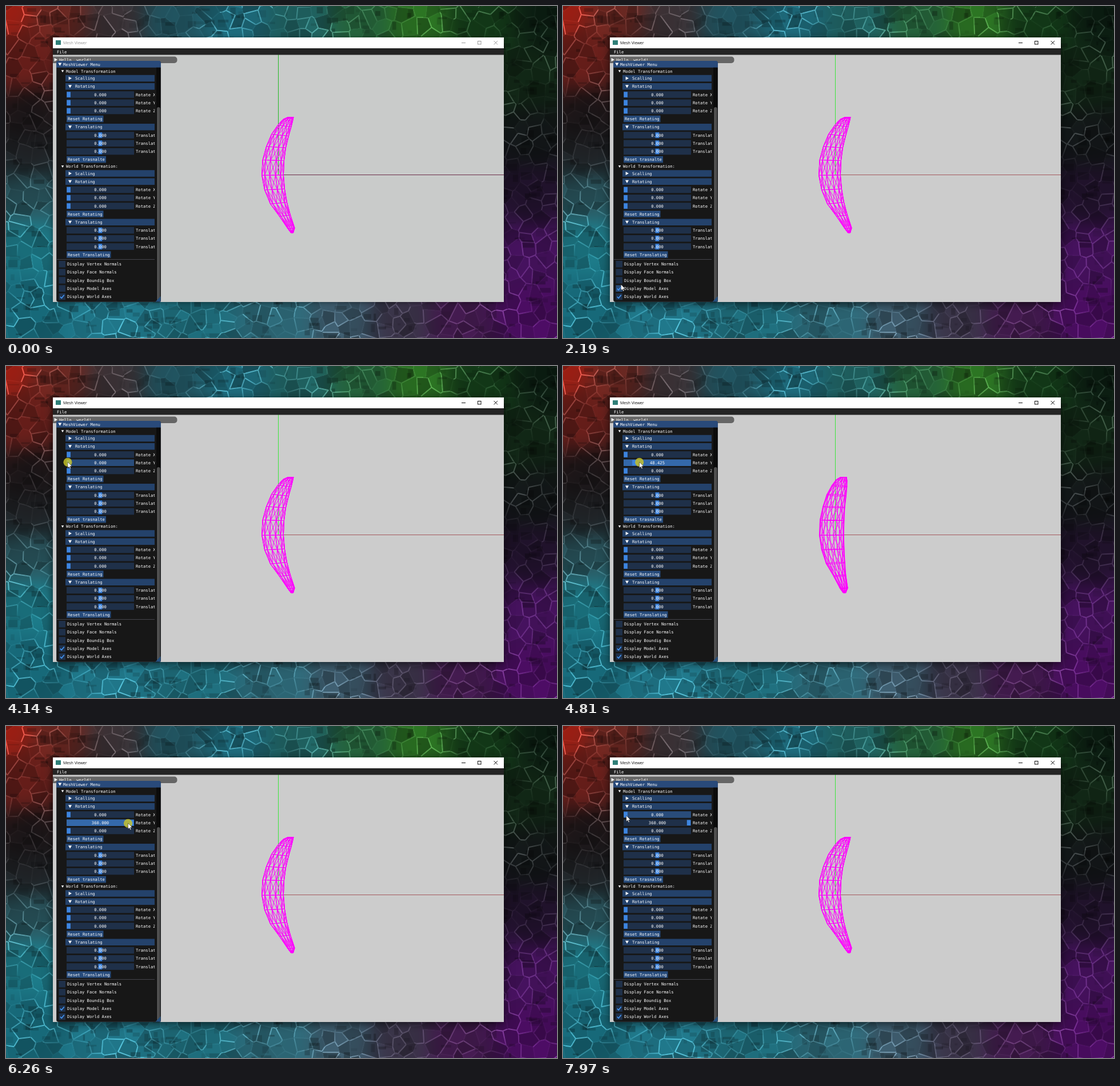
An HTML page with a canvas for the animation above (8 s loop, 964 by 581 pixels).

```html
<!DOCTYPE html>
<html lang="en">
<head>
<meta charset="utf-8">
<title>Mesh Viewer</title>
<style>
html, body { margin: 0; width: 100%; height: 100%; overflow: hidden; background: #123; }
canvas { display: block; }
</style>
</head>
<body>
<canvas id="stage" width="964" height="581"></canvas>
<script>
const W = 964, H = 581, LOOP = 8000, STEP = 57.5, LAG = 110;
const ctx = document.getElementById('stage').getContext('2d');
const MONO = '7.2px "DejaVu Sans Mono", monospace';
const clamp = (v, a, b) => Math.max(a, Math.min(b, v));
const hash = n => { const s = Math.sin(n * 127.1 + 11.7) * 43758.5453; return s - Math.floor(s); };

// ---------- wallpaper: cracked cells over a blend of colour spots ----------
const SPOTS = [
  [0, 0, 0x8c1a10], [90, 10, 0x64251f], [190, 25, 0x372f33], [290, 25, 0x1d4b56],
  [400, 25, 0x1b6373], [520, 25, 0x1d5a5a], [620, 25, 0x205633], [720, 20, 0x296c20],
  [830, 20, 0x123817], [950, 20, 0x0a1a10], [30, 100, 0x621c18], [40, 190, 0x181416],
  [40, 260, 0x1c1d20], [40, 330, 0x275058], [40, 420, 0x1a727f], [40, 520, 0x15606f],
  [910, 130, 0x102414], [920, 230, 0x111516], [920, 330, 0x1d1027], [920, 430, 0x3f1055],
  [920, 540, 0x440b59], [180, 550, 0x1d6c7d], [330, 550, 0x1b626f], [480, 550, 0x2a6270],
  [590, 550, 0x385363], [690, 550, 0x342e40], [790, 550, 0x3d1847]
];

function blend(x, y) {
  let r = 0, g = 0, b = 0, sum = 0;
  for (const [sx, sy, c] of SPOTS) {
    const w = 1 / ((x - sx) ** 2 + (y - sy) ** 2 + 1500) ** 2;
    r += w * (c >> 16); g += w * (c >> 8 & 255); b += w * (c & 255); sum += w;
  }
  return [r / sum, g / sum, b / sum];
}

// slow waves from 0 to 1 that make the cracks glow in patches
const patch = (x, y) => .5 + .25 * Math.sin(x / 31 + 2 * Math.sin(y / 43)) + .25 * Math.sin(y / 27 + 2 * Math.sin(x / 57));

function makeWallpaper() {
  const cv = document.createElement('canvas');
  cv.width = W; cv.height = H;
  const g = cv.getContext('2d'), img = g.createImageData(W, H), G = 23;
  const site = (i, j) => {
    const id = i * 57 + j * 131;
    return { id, x: (i + .5 + (hash(id) - .5) * .95) * G, y: (j + .5 + (hash(id + .5) - .5) * .95) * G };
  };
  const sites = [];
  const cols = Math.ceil(W / G) + 4, rows = Math.ceil(H / G) + 4;
  for (let j = 0; j < rows; j++) for (let i = 0; i < cols; i++) sites.push(site(i - 2, j - 2));
  for (let y = 0; y < H; y++) for (let x = 0; x < W; x++) {
    if (x > 82 && x < 870 && y > 55 && y < 517) continue;
    const ci = Math.floor(x / G) + 2, cj = Math.floor(y / G) + 2;
    let a, b, da = 1e9, db = 1e9;
    for (let j = cj - 1; j <= cj + 1; j++) for (let i = ci - 1; i <= ci + 1; i++) {
      const s = sites[j * cols + i], d = (s.x - x) ** 2 + (s.y - y) ** 2;
      if (d < da) { b = a; db = da; a = s; da = d; } else if (d < db) { b = s; db = d; }
    }
    const edge = (db - da) / (2 * Math.hypot(a.x - b.x, a.y - b.y));
    const k = clamp(1.5 - edge, 0, 1) * (hash(a.id + b.id + .3) > .3 ? patch(x, y) : .1);
    const shade = .8 + .35 * hash(a.id + .8), p = (y * W + x) * 4;
    blend(x, y).forEach((c, n) => {
      img.data[p + n] = c * shade + (c * .4 + 48) * k;
    });
    img.data[p + 3] = 255;
  }
  g.putImageData(img, 0, 0);
  for (let n = 0; n < 900; n++) {
    g.fillStyle = `rgba(0,0,0,${.06 + .2 * hash(n + .1)})`;
    g.fillRect(hash(n + .2) * W, hash(n + .4) * H, 3 + hash(n + .6) * 18, 2 + hash(n + .7) * 12);
  }
  return cv;
}
const wallpaper = makeWallpaper();

// ---------- pointer ----------
const PATH = [
  [210, 893, 572], [450, 560, 430], [700, 260, 330], [960, 142, 301], [1770, 97, 490],
  [2080, 101, 488], [2330, 102, 486], [2610, 120, 383], [2917, 131, 254], [3027, 133, 236],
  [3420, 118, 208], [3790, 108, 168], [4200, 108, 168], [4750, 126, 168], [5000, 158, 168],
  [5217.5, 185.43, 168], [5327.5, 201, 168.5], [5450, 207, 169], [5780, 224, 169],
  [5980, 224, 170], [6137.5, 221, 170], [6247.5, 213.5, 170], [6450, 210, 170],
  [6600, 212, 170], [6900, 240, 170], [7080, 240, 170], [7400, 190, 160], [7860, 111, 157],
  [7972, 110.5, 156.5]
];
function pointer(t) {
  if (t < PATH[0][0]) return null;
  const n = PATH.findIndex(k => k[0] > t);
  if (n < 0) return PATH[PATH.length - 1].slice(1);
  const [ta, xa, ya] = PATH[n - 1], [tb, xb, yb] = PATH[n], u = (t - ta) / (tb - ta);
  return [xa + (xb - xa) * u, ya + (yb - ya) * u];
}

// ---------- drawing helpers ----------
function box(x, y, w, h, fill, r = 0) {
  ctx.fillStyle = fill;
  ctx.beginPath();
  ctx.roundRect(x, y, w, h, r);
  ctx.fill();
}
function poly(points, fill) {
  ctx.fillStyle = fill;
  ctx.beginPath();
  points.forEach(([x, y]) => ctx.lineTo(x, y));
  ctx.closePath();
  ctx.fill();
}
function line(x1, y1, x2, y2, color, width = 1) {
  ctx.strokeStyle = color;
  ctx.lineWidth = width;
  ctx.beginPath();
  ctx.moveTo(x1, y1);
  ctx.lineTo(x2, y2);
  ctx.stroke();
}
function text(s, x, y, align = 'left', color = '#fff', font = MONO) {
  ctx.font = font;
  ctx.fillStyle = color;
  ctx.textAlign = align;
  ctx.textBaseline = 'alphabetic';
  ctx.fillText(s, x, y + 2.6);
}
function arrow(x, y, open, s = 3) {
  poly(open ? [[x - s, y - s * .8], [x + s, y - s * .8], [x, y + s]]
            : [[x - s * .8, y - s], [x + s, y], [x - s * .8, y + s]], '#fff');
}

// ---------- mesh ----------
// rings: height, left and right edge around the vertical axis
const RINGS = [
  [194.5, 17, 26.5], [200, 8, 25], [210, -1, 22.5], [226, -12, 18], [247, -21, 13], [270, -27.5, 10],
  [296, -29, 9], [321, -24, 11], [345, -14, 15], [367, 2, 21], [389, 16.5, 28.5], [397, 22, 26]
];
const SIDES = 12, OX = 476.5, OY = 295.5;
const mid = ([, l, r]) => (l + r) / 2;
const verts = RINGS.map((ring, i) => {
  const [y, l, r] = ring, up = RINGS[i - 1], down = RINGS[i + 1];
  const tilt = up && down ? -.25 * (mid(down) - mid(up)) / (down[0] - up[0]) : 0;
  return Array.from({ length: SIDES }, (_, k) => {
    const a = (k + .5) / SIDES * 2 * Math.PI, rad = (r - l) / 2, dx = rad * Math.cos(a) * 1.03;
    return [mid(ring) + dx, y + tilt * dx, rad * 1.22 * Math.sin(a)];
  });
});
function drawMesh(deg) {
  const co = Math.cos(deg * Math.PI / 180), si = Math.sin(deg * Math.PI / 180);
  const put = ([x, y, z], f) => ctx[f](OX + x * co + z * si, y);
  const edge = (a, b) => { put(a, 'moveTo'); put(b, 'lineTo'); };
  ctx.strokeStyle = '#f0f';
  ctx.lineWidth = 1;
  ctx.beginPath();
  verts.forEach((ring, i) => ring.forEach((v, k) => {
    const n = (k + 1) % SIDES, next = verts[i + 1];
    edge(v, ring[n]);
    if (next) {
      edge(v, next[k]);
      edge(i % 2 ? v : ring[n], next[i % 2 ? n : k]);
    }
  }));
  ctx.stroke();
}
function drawScene(deg, focus, axes) {
  const a = deg * Math.PI / 180, L = 80;
  box(82, 85, 789, 433, focus ? '#cccccc' : '#c9cbca');
  line(OX, 85, OX, OY, axes ? '#3be63b' : '#25b825');
  if (axes) {
    line(OX, OY, OX + L * Math.cos(a), OY, '#b03030');
    line(OX, OY, OX + L * Math.sin(a), OY, '#2020c8');
  }
  line(OX, OY, 871, OY, axes ? '#a45a5e' : '#6e2f4c');
  drawMesh(deg);
}

// ---------- window frame ----------
function drawFrame(focus) {
  ctx.save();
  ctx.shadowColor = focus ? 'rgba(0,0,0,.6)' : 'rgba(0,0,0,.4)';
  ctx.shadowBlur = focus ? 14 : 8;
  ctx.shadowOffsetY = focus ? 3 : 1;
  box(82, 55, 789, 463, '#fff');
  ctx.restore();
  const ink = focus ? '#111' : '#999';
  box(87, 60, 9, 8, '#2f7f78');
  text('Mesh Viewer', 100, 64.6, 'left', ink, '7px "Open Sans", sans-serif');
  line(797, 64.5, 804, 64.5, ink);
  ctx.strokeRect(825.5, 61.5, 5.5, 5.5);
  line(853.5, 61, 860, 67.5, ink);
  line(860, 61, 853.5, 67.5, ink);
}

// ---------- control panel ----------
let mouse = null;   // where the program sees the pointer, null when it cannot hover

const over = (x, y, w, h) => mouse &&
  mouse[0] >= x && mouse[0] < x + w && mouse[1] >= y && mouse[1] < y + h;

function node(label, y) {
  arrow(99, y, true, 2.2);
  text(label, 105, y);
}
function header(label, y, open) {
  box(104, y - 5.7, 156, 11.5, over(104, y - 6, 156, 12) ? '#3878c6' : '#24426b');
  arrow(112, y, open);
  text(label, 121, y);
}
function slider(label, y, pos, value, active) {
  const hot = over(106, y - 6, 118, 12);
  box(106, y - 5.7, 118, 11.5, active ? '#3469aa' : hot ? '#294c7a' : '#1f3049');
  box(106.3 + pos * 110.5, y - 4.7, 6.6, 9.5, '#3d85e0');
  text(value, 165, y, 'center');
  text(label, 227, y);
}
function button(label, y, w) {
  box(106, y - 5.7, w, 11.5, over(106, y - 6, w, 12) ? '#4296fa' : '#274b7b');
  text(label, 108, y);
}
function check(label, y, on) {
  box(92.5, y - 5.7, 11.5, 11.5, over(92, y - 7, 100, 13) ? '#294c7a' : '#1f3049');
  if (on) {
    ctx.strokeStyle = '#4296fa';
    ctx.lineWidth = 1.6;
    ctx.beginPath();
    ctx.moveTo(94.8, y + .4);
    ctx.lineTo(97.2, y + 2.8);
    ctx.lineTo(101.7, y - 2.6);
    ctx.stroke();
  }
  text(label, 107, y);
}
function group(y, deg, dragging, reset, resetWidth) {
  header('Scalling', y + 12.5, false);
  header('Rotating', y + 26.6, true);
  [0, deg, 0].forEach((d, i) =>
    slider('Rotate ' + 'XYZ'[i], y + 41 + i * 14.2, d / 360, d.toFixed(3), dragging && i === 1));
  button('Reset Rotating', y + 83.5, 64.5);
  header('Translating', y + 97.6, true);
  for (let i = 0; i < 3; i++) slider('Translate ' + 'XYZ'[i], y + 112 + i * 14.2, .5, '0.000');
  button(reset, y + 154.4, resetWidth);
}
function drawPanel(deg, axes, dragging) {
  box(82, 74, 789, 11.5, '#242424');
  text('File', 89, 80);
  box(82, 88.5, 217.5, 11.5, '#666', [0, 5, 5, 0]);
  arrow(87, 94, false);
  text('Hello, world!', 93, 94.4);

  box(88, 96, 183, 422, '#3c4048', 4);
  box(88.7, 96.5, 181.6, 421, '#171717', 4);
  box(88, 96, 183, 11.7, '#294a7a', [4, 4, 0, 0]);
  arrow(94.3, 101.8, true);
  text('MeshViewer Menu', 100, 101.9);
  box(263, 107.7, 7.5, 409.8, '#0b0b0b');
  box(264, 177, 5.6, 340, '#4f4f4f', 2.8);
  poly([[270.5, 508], [270.5, 517.5], [261.5, 517.5]], '#25507f');

  ctx.save();
  ctx.beginPath();
  ctx.rect(88, 108, 172.3, 410);
  ctx.clip();
  node('Model Transformation', 114);
  group(114, deg, dragging, 'Reset trasnalte', 69);
  node('World Transformation:', 280.7);
  group(280.5, 0, false, 'Reset Translating', 77.5);
  line(89, 443.5, 260, 443.5, '#44444c');
  ['Vertex Normals', 'Face Normals', 'Boundig Box', 'Model Axes', 'World Axes'].forEach((s, i) =>
    check('Display ' + s, 451.6 + i * 14.2, i === 4 || (i === 3 && axes)));
  ctx.restore();
}

function drawPointer([x, y], pressed) {
  if (pressed) {
    ctx.fillStyle = 'rgba(205,200,40,.8)';
    ctx.beginPath();
    ctx.arc(x, y + .3, 7.6, 0, 7);
    ctx.fill();
  }
  const shape = [[0, 0], [0, 10.5], [2.4, 8.3], [4, 12], [5.6, 11.3], [4, 7.7], [7.3, 7.5]]
    .map(([a, b]) => [x + a, y + b]);
  poly(shape, '#fff');
  ctx.strokeStyle = 'rgba(0,0,0,.75)';
  ctx.lineWidth = .6;
  ctx.stroke();
}

function draw(t) {
  if (t >= 210) t = 210 + Math.floor((t - 210) / STEP + 1e-6) * STEP;
  const focus = t >= 1880, axes = t >= 2060, dragging = t >= 4200 && t < 7080;
  const seen = pointer(t), late = pointer(t - LAG);
  const deg = dragging ? clamp((late[0] - 109.5) / 110.5, 0, 1) * 360 : t < 4200 ? 0 : 360;
  mouse = focus && !dragging ? late : null;
  ctx.drawImage(wallpaper, 0, 0);
  drawFrame(focus);
  drawScene(deg, focus, axes);
  drawPanel(deg, axes, dragging);
  if (seen) drawPointer(seen, (focus && t < 2080) || (t >= 3950 && t < 7080));
}

const start = performance.now();
function tick() {
  draw((performance.now() - start) % LOOP);
  requestAnimationFrame(tick);
}
tick();
</script>
</body>
</html>
```
